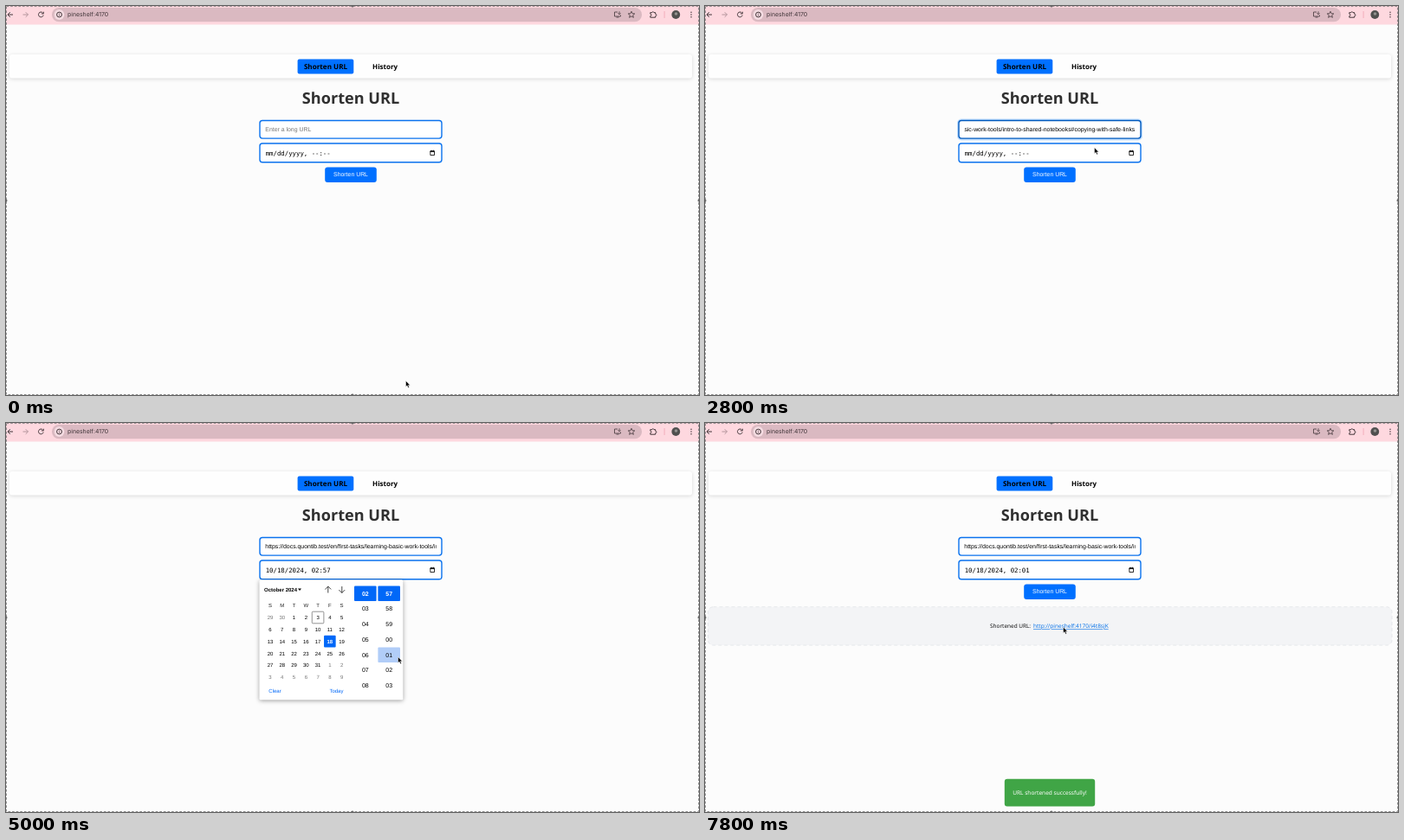
Animation, 800 px wide and 450 px high, one loop 8000 ms. Source, as an HTML page:

```html
<!DOCTYPE html>
<html lang="en">
<head>
<meta charset="utf-8">
<title>URL shortener demo</title>
<style>
html, body { margin: 0; width: 100%; height: 100%; overflow: hidden; background: #fcfcfc; }
svg { display: block; width: 100vw; height: 100vh; }
text { text-rendering: geometricPrecision; white-space: pre; }
.ui { font-family: "Noto Sans", "Open Sans", sans-serif; }
.form { font-family: "Liberation Sans", Arial, sans-serif; }
.mono { font-family: "DejaVu Sans Mono", monospace; }
.bar { font-family: Inter, Roboto, sans-serif; }
.b { font-weight: 700; }
.mid { text-anchor: middle; }
.end { text-anchor: end; }
.card { filter: drop-shadow(0 1.5px 2px rgba(0,0,0,.14)); }
.pop { filter: drop-shadow(0 1.5px 2.5px rgba(0,0,0,.38)); }
.line { fill: none; stroke: #43363a; stroke-width: 1; }
</style>
</head>
<body>
<svg id="stage" viewBox="0 0 800 450">
  <defs><clipPath id="field"><rect x="299" y="134" width="197.8" height="18"/></clipPath></defs>
</svg>
<script>
const NS = 'http://www.w3.org/2000/svg';
const stage = document.getElementById('stage');
const BLUE = '#0070ff', PICK = '#0068f8', HOVER = '#b1cdf8';
const LOOP = 8000, STEP = 200;
const HOST = 'pineshelf:4170';
const URL_HEAD = 'https://docs.quontib.test/en/first-tasks/learning-basic-work-tools/intro';
const URL_TAIL = 'basic-work-tools/intro-to-shared-notebooks#copying-with-safe-links';

function el(parent, tag, attrs) {
  const e = document.createElementNS(NS, tag);
  for (const k in attrs) e.setAttribute(k, attrs[k]);
  return parent.appendChild(e);
}
const group = (parent, attrs) => el(parent, 'g', attrs);
const rect = (p, x, y, width, height, fill, more) => el(p, 'rect', { x, y, width, height, fill, ...more });
const circle = (p, cx, cy, r, more) => el(p, 'circle', { cx, cy, r, ...more });
const path = (p, d, more) => el(p, 'path', { d, class: 'line', ...more });
function text(p, str, x, y, size, cls, fill = '#000') {
  const t = el(p, 'text', { x, y, 'font-size': size, class: cls, fill });
  t.textContent = str;
  return t;
}
const show = (e, on) => e.setAttribute('visibility', on ? 'visible' : 'hidden');
const set = (e, name, value) => e.setAttribute(name, value);

function toolbar() {
  const g = group(stage);
  rect(g, 0, 0, 800, 21.5, '#fed8df');
  rect(g, 53, 2, 681, 16.3, '#dab9c1', { rx: 8.1 });
  path(g, 'M8 10H2M4.8 7.2L2 10L4.8 12.8');
  path(g, 'M19.5 10H25.5M22.7 7.2L25.5 10L22.7 12.8', { stroke: '#b3959c', style: 'stroke:#b3959c' });
  path(g, 'M42.4 7.8A2.9 2.9 0 1 0 43.2 10.6M43.3 6.7V8.9H41');
  circle(g, 61.5, 10, 5.9, { fill: '#f4dbe1' });
  circle(g, 61.5, 10, 2.9, { class: 'line', 'stroke-width': .8 });
  path(g, 'M61.5 9.6V11.5M61.5 8.2V8.9', { style: 'stroke-width:.7' });
  text(g, HOST, 71, 12.4, 6.9, 'bar', '#43373b');
  path(g, 'M706 7H702.5V12H709.5V10.5M704.5 13H707.5M708 6.3V9.6M706.5 8.3L708 9.8L709.5 8.3', { style: 'stroke-width:.8' });
  path(g, 'M722 6.2L723.1 8.7L725.8 8.9L723.7 10.7L724.4 13.3L722 11.9L719.6 13.3L720.3 10.7L718.2 8.9L720.9 8.7Z', { style: 'stroke-width:.8' });
  path(g, 'M743.8 7.6H745.7A1.2 1.2 0 0 1 748 7.6H749.7V9.3A1.2 1.2 0 0 1 749.7 11.7V13.2H743.8V11.6A1.2 1.2 0 0 0 743.8 9.2Z');
  rect(g, 759.6, 6, 1, 8, '#f3aebb');
  circle(g, 773.3, 10, 4.9, { fill: '#50504f' });
  circle(g, 773.5, 9, 1.8, { fill: '#92918f' });
  for (const y of [7.2, 10, 12.8]) circle(g, 791, y, .75, { fill: '#43363a' });
}

function page() {
  rect(stage, 4, 56, 788, 27.5, '#fefefe', { rx: 3, class: 'card' });
  rect(stage, 336.6, 61.4, 64.7, 17.2, BLUE, { rx: 2 });
  text(stage, 'Shorten URL', 369, 73, 8.1, 'ui b mid');
  text(stage, 'History', 437.6, 73, 8, 'ui b mid');
  text(stage, 'Shorten URL', 398, 113.3, 18.1, 'ui b mid', '#303030');
}

function form() {
  const box = (y, h) => rect(stage, 293, y, 210, h, '#fff', { rx: 3, stroke: '#0a72ee', 'stroke-width': 1.4 });
  const glow = rect(stage, 291, 130.5, 214, 25, '#bfdeff', { rx: 5 });
  const urlBox = box(132.5, 20.6);
  box(159, 21.8);
  const hint = text(stage, 'Enter a long URL', 299.3, 145, 6.92, 'form', '#757575');
  const clip = group(stage, { 'clip-path': 'url(#field)' });
  const head = text(clip, URL_HEAD, 299.3, 145, 6.92, 'form');
  const tail = text(clip, URL_TAIL, 496.3, 145, 6.92, 'form end');
  const caret = rect(stage, 496.3, 138.8, .7, 7.8, '#000');
  const date = text(stage, '', 299.7, 172.5, 7.33, 'mono');
  path(stage, 'M489.9 168H494.5V172.6H489.9ZM491 166.7V168M493.4 166.7V168', { style: 'stroke:#111;stroke-width:.9' });
  rect(stage, 489.6, 167.5, 5.2, 1.4, '#111');
  const button = group(stage);
  const face = rect(button, 368.2, 186.4, 59.6, 17.7, BLUE, { rx: 3 });
  text(button, 'Shorten URL', 398, 197.4, 6.92, 'form mid', '#fff');
  return { glow, urlBox, hint, head, tail, caret, date, button, face };
}

function result() {
  const g = group(stage);
  rect(g, 3.5, 212.7, 789.5, 44.4, '#f3f4f6', { rx: 6, stroke: '#e1e4e8', 'stroke-width': .8, 'stroke-dasharray': '4 3' });
  text(g, 'Shortened URL: ', 329, 237.4, 6.45, 'ui', '#111');
  const link = text(g, 'http://' + HOST + '/i4t8sjK', 379, 237.4, 6.5, 'ui', '#0b74e8');
  rect(g, 345.8, 411.7, 104.4, 31.8, '#40a546', { rx: 3 });
  text(g, 'URL shortened successfully!', 398, 430.2, 6.55, 'ui mid', '#fff');
  return { g, link };
}

const dayX = c => 305 + c * 13.77, dayY = r => 225 + r * 13.8;
const timeX = c => 414.8 + c * 27.4, timeY = r => 197.2 + r * 17.75;

function picker() {
  const g = group(stage);
  rect(g, 292.5, 181.5, 165.8, 138.8, '#fff', { rx: 1.5, class: 'pop' });
  text(g, 'October 2024', 298, 194.6, 6, 'form b');
  path(g, 'M337 191.5H341L339 194Z', { style: 'fill:#000;stroke:none' });
  path(g, 'M371.8 196.5V189M368.4 192.4L371.8 189L375.2 192.4M387.8 189V196.5M384.4 193.1L387.8 196.5L391.2 193.1', { style: 'stroke:#333;stroke-width:.9' });
  [...'SMTWTFS'].forEach((d, c) => text(g, d, dayX(c), 212.7, 6, 'form mid', '#222'));
  const days = [], times = [];
  for (let i = 0; i < 42; i++) {
    const n = i - 1, x = dayX(i % 7), y = dayY(Math.floor(i / 7));
    const bg = rect(g, x - 6.8, y - 6.8, 13.6, 13.6, 'none', { rx: 1, 'stroke-width': .8 });
    const num = n < 1 ? n + 30 : n > 31 ? n - 31 : n;
    days.push({ n, x, y, bg, label: text(g, num, x, y + 2.2, 6, 'form mid', n < 1 || n > 31 ? '#757575' : '#000') });
  }
  for (let c = 0; c < 2; c++) for (let r = 0; r < 7; r++) {
    const num = c ? (57 + r) % 60 : 2 + r, x = timeX(c), y = timeY(r);
    const bg = rect(g, x - 12.8, y - 8.8, 25.6, 17.5, 'none', { rx: 1 });
    times.push({ c, r, x, y, bg, label: text(g, String(num).padStart(2, '0'), x, y + 2.5, 7, 'form mid') });
  }
  text(g, 'Clear', 303.3, 311.6, 6, 'form', PICK);
  text(g, 'Today', 389.4, 311.6, 6, 'form end', PICK);
  return { g, days, times };
}

toolbar();
page();
const ui = form(), res = result(), pop = picker();

// recording-area outline with its edge handles
rect(stage, .5, .4, 799, 449.1, 'none', { stroke: '#777', 'stroke-width': .8, 'stroke-dasharray': '2.8 1.8' });
for (const [x, y] of [[400, 0], [400, 450], [0, 225], [800, 225]]) circle(stage, x, y, 1.5, { fill: '#666' });

const arrow = el(stage, 'path', { d: 'M0 0V7L1.6 5.6L2.8 8.2L4 7.6L2.9 5.2H5Z', fill: '#000', stroke: '#fff', 'stroke-width': .5 });
const hand = el(stage, 'path', {
  d: 'M-.8 .4Q0 -.5 .7 .4V3L2.9 3.5Q3.6 3.8 3.4 5L2.7 8H-1.2L-3 5Q-2.9 4 -1.8 4.5L-.8 5.2Z',
  fill: '#111', stroke: '#fff', 'stroke-width': .7
});

// pointer stops: time, x, y
const STOPS = [
  [0, 461.5, 433.5], [200, 461.5, 433.5], [1200, 320, 146], [1600, 319.5, 150], [2400, 319.5, 150],
  [3000, 495, 168.5], [3400, 495, 168.5], [4000, 374, 251], [4400, 374, 251],
  [4800, 452.5, 270.5], [5200, 452.5, 270.5], [5800, 493, 242.5], [6000, 493, 242.5],
  [6600, 396.5, 194], [7000, 396.5, 194], [7600, 413.5, 236], [LOOP, 413.5, 236]
];
function pointer(t) {
  const i = STOPS.findIndex(s => s[0] > t);
  const [t0, x0, y0] = STOPS[i - 1], [t1, x1, y1] = STOPS[i];
  const p = (t - t0) / (t1 - t0), k = p * p * (3 - 2 * p);
  return [x0 + (x1 - x0) * k, y0 + (y1 - y0) * k];
}

function drawPicker(t, px, py) {
  const chosen = t >= 4200 ? 18 : 3, minute = t >= 5200 ? 4 : 0;
  const over = (o, w, h) => Math.abs(px - o.x) < w && Math.abs(py - o.y) < h;
  const paint = (o, on, hot) => {
    set(o.bg, 'fill', on ? PICK : hot ? HOVER : 'none');
    if (on) o.label.style.fill = '#fff'; else o.label.style.fill = '';
    o.label.style.fontWeight = on ? 700 : 400;
  };
  for (const d of pop.days) {
    paint(d, d.n === chosen, over(d, 6.8, 6.8));
    set(d.bg, 'stroke', d.n === 3 && chosen !== 3 ? '#777' : 'none');
  }
  for (const c of pop.times) paint(c, c.r === (c.c ? minute : 0), over(c, 12.8, 8.8));
}

function draw(now) {
  const t = Math.floor(now % LOOP / STEP) * STEP;
  const [x, y] = pointer(t);
  const focus = t >= 1400 && t < 3000, pasted = t >= 1800;
  const open = t >= 3000 && t < 5600, done = t >= 6800;

  show(ui.glow, focus);
  set(ui.urlBox, 'stroke', focus ? '#0059bd' : '#0a72ee');
  show(ui.hint, !pasted);
  show(ui.head, pasted && !focus);
  show(ui.tail, pasted && focus);
  show(ui.caret, focus && Math.floor(t / 500) % 2 === 0);
  set(ui.caret, 'x', pasted ? 496.3 : 299);
  ui.date.textContent = t < 4200 ? 'mm/dd/yyyy, --:--' : '10/18/2024, 02:' + (t < 5200 ? '57' : '01');

  const onButton = !open && x > 368 && x < 428 && y > 186 && y < 204;
  const onLink = done && x > 379 && x < 467 && y > 230 && y < 240;
  set(ui.face, 'fill', onButton ? '#2967b1' : BLUE);
  set(ui.button, 'transform', `translate(0 ${onButton ? -.7 : 0})`);
  show(res.g, done);
  set(res.link, 'text-decoration', onLink ? 'underline' : 'none');

  show(pop.g, open);
  if (open) drawPicker(t, x, y);

  show(arrow, !onButton);
  show(hand, onButton);
  for (const c of [arrow, hand]) set(c, 'transform', `translate(${x} ${y})`);
}

let start;
function tick(now) {
  start ??= now;
  draw(now - start);
  requestAnimationFrame(tick);
}
draw(0);
requestAnimationFrame(tick);
</script>
</body>
</html>
```
